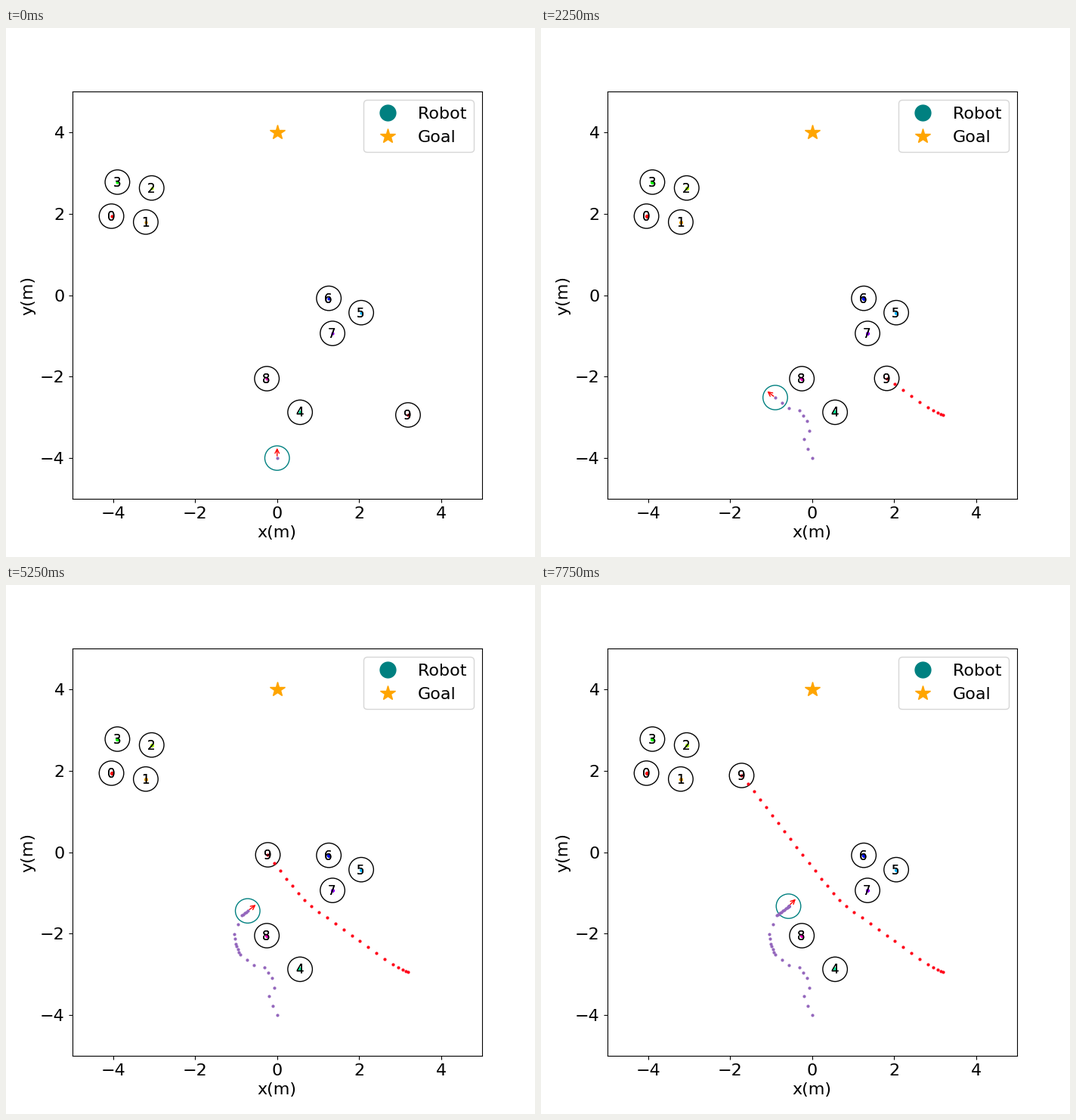
These frames come from a looping animation (700 by 700 pixels, 8000 ms). A matplotlib script:

```python
import numpy as np
import matplotlib.pyplot as plt
from matplotlib.animation import FuncAnimation
from matplotlib.lines import Line2D
from matplotlib.patches import ArrowStyle, Circle, FancyArrowPatch

FRAMES, INTERVAL = 32, 250
RADIUS = 0.3
TEXT_OFFSET = 0.11
RAMP = 4          # steps the walker needs to reach full speed
STOP = 26         # step at which the robot halts

steps = np.arange(FRAMES)


def group(count, center, radius, start):
    """People standing evenly spaced around a centre."""
    angles = np.radians(start) + 2 * np.pi * np.arange(count) / count
    return center + radius * np.column_stack([np.cos(angles), np.sin(angles)])


def travel(times, keys):
    """Even pace between key points given as (step, x, y)."""
    when, x, y = np.transpose(keys)
    return np.column_stack([np.interp(times, when, x),
                            np.interp(times, when, y)])


def stand(spots):
    return [np.tile(spot, (FRAMES, 1)) for spot in spots]


# The walker speeds up, heads left, then bends round the standing group
eased = np.where(steps < RAMP, RAMP * (steps / RAMP) ** 1.5, steps)
walker = travel(eased, [
    (0, 3.193, -2.941), (RAMP, 2.825, -2.764), (13, 1.018, -1.466),
    (15, 0.668, -1.178), (18, 0.222, -0.65), (31, -1.719, 1.883)])

people = (stand(group(4, (-3.55, 2.285), 0.6, 215.2))
          + stand([(0.56, -2.875)])
          + stand(group(3, (1.555, -0.482), 0.5, 6))
          + stand([(-0.25, -2.05)])
          + [walker])

# The robot weaves up, dodges left, rounds a person and halts
robot_path = travel(steps, [
    (0, 0, -4), (2, -0.194, -3.54), (3, -0.069, -3.33), (4, -0.124, -3.089),
    (6, -0.309, -2.829), (7, -0.567, -2.774), (9, -0.899, -2.514),
    (13, -1.01, -2.254), (15, -1.037, -2.013), (17, -0.862, -1.549),
    (24, -0.61, -1.361), (STOP, -0.576, -1.327)])


def heading(step):
    """Direction of the latest move; straight up before the first."""
    if step == 0:
        return np.pi / 2
    step = min(step, STOP)
    dx, dy = robot_path[step] - robot_path[step - 1]
    return np.arctan2(dy, dx)


plt.rcParams['text.kerning_factor'] = 6   # whole-pixel kerning
fig, ax = plt.subplots(figsize=(7, 7), dpi=100)
ax.tick_params(labelsize=16)
ax.set_xlim(-5, 5)
ax.set_ylim(-5, 5)
ax.set_xlabel('x(m)', fontsize=16)
ax.set_ylabel('y(m)', fontsize=16)


def symbol(color, marker):
    return Line2D([0], [4], color=color, marker=marker, linestyle='None',
                  markersize=15)


def trail(color):
    return ax.plot([], [], 'o', color=color, markersize=2)[0]


goal = symbol('orange', '*')
ax.add_artist(goal)
ax.legend([symbol('teal', 'o'), goal], ['Robot', 'Goal'], fontsize=16)

cmap = plt.get_cmap('hsv', len(people))
rings, labels, trails = [], [], []
for i, path in enumerate(people):
    rings.append(ax.add_artist(Circle(path[0], RADIUS, fill=False)))
    trails.append(trail(cmap(i)))
    # Two layers give the digits their heavier edges
    labels.append([ax.text(0, 0, str(i), color='black', fontsize=12)
                   for _ in range(2)])

robot = ax.add_artist(Circle(robot_path[0], RADIUS, fill=False, color='teal'))
robot_trail = trail('tab:purple')
arrow = ax.add_artist(FancyArrowPatch(
    (0, 0), (0, 1), color='red',
    arrowstyle=ArrowStyle('->', head_length=4, head_width=2)))


def update(step):
    for path, ring, pair, dots in zip(people, rings, labels, trails):
        ring.center = path[step]
        for label in pair:
            label.set_position(path[step] - TEXT_OFFSET)
        dots.set_data(*path[:step + 1].T)
    pos, angle = robot_path[step], heading(step)
    robot.center = pos
    robot_trail.set_data(*robot_path[:step + 1].T)
    tip = pos + RADIUS * np.array([np.cos(angle), np.sin(angle)])
    arrow.set_positions(tuple(pos), tuple(tip))
    return []


anim = FuncAnimation(fig, update, frames=FRAMES, interval=INTERVAL,
                     init_func=lambda: update(0), repeat=True)
plt.show()
```
